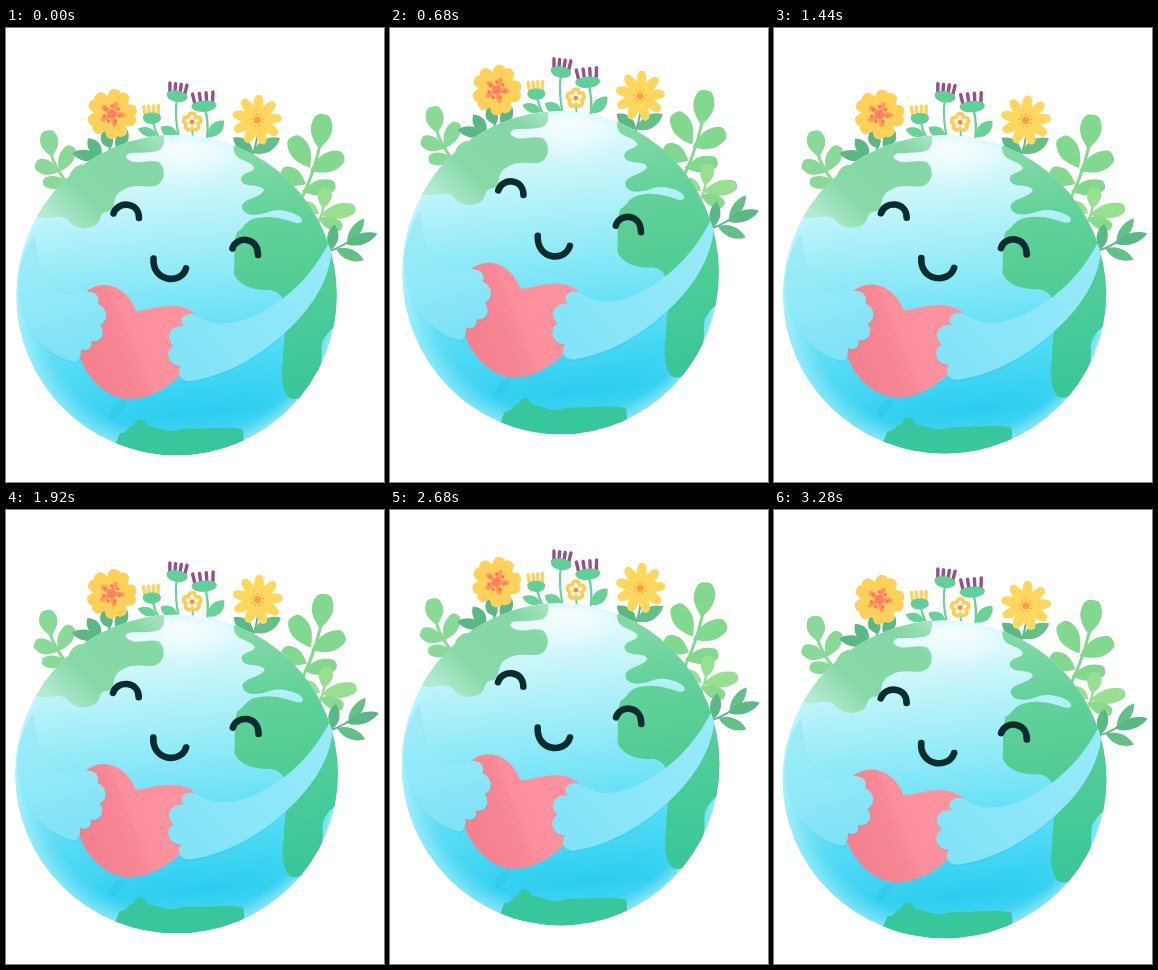
Recreate the animation shown at these times as an HTML page with a canvas. Size 378 by 454 pixels, loop 3320 ms.

```html
<!DOCTYPE html>
<html lang="en">
<head>
<meta charset="utf-8">
<title>Happy Earth</title>
<style>
html, body { margin: 0; width: 100%; height: 100%; overflow: hidden; background: #fff; }
canvas { display: block; width: 378px; height: 454px; }
</style>
</head>
<body>
<canvas id="stage" width="378" height="454"></canvas>
<script>
const ctx = document.getElementById('stage').getContext('2d');
const LOOP = 3320, STEP = 40;
const CX = 170.5, CY = 267, R = 160.3;
const TOP = 55, BASE = 427;

// time, highest flower, bottom of the globe
const bounce = [
  [0, 55, 427], [360, 44, 418], [560, 34.5, 410], [790, 29, 404],
  [1000, 33, 408], [1120, 38.5, 412.5], [1400, 54, 424], [1640, 60, 428.5],
  [1920, 53, 423], [2240, 40.5, 415], [2320, 38, 413], [2460, 36.5, 411.5],
  [2640, 39.5, 414], [2800, 46.5, 419.5], [2960, 54, 424], [3140, 59, 428],
  [3280, 59, 428], [3320, 58.5, 427.5]
];

function sample(t, col) {
  const n = bounce.length;
  let i = 0;
  while (i < n - 2 && t >= bounce[i + 1][0]) i++;
  const slope = j => {
    const a = bounce[Math.max(j - 1, 0)], b = bounce[Math.min(j + 1, n - 1)];
    return (b[col] - a[col]) / (b[0] - a[0]);
  };
  const a = bounce[i], b = bounce[i + 1], d = b[0] - a[0], u = (t - a[0]) / d;
  const u2 = u * u, u3 = u2 * u;
  return (2 * u3 - 3 * u2 + 1) * a[col] + (u3 - 2 * u2 + u) * d * slope(i) +
    (3 * u2 - 2 * u3) * b[col] + (u3 - u2) * d * slope(i + 1);
}

function linear(x0, y0, x1, y1, ...stops) {
  const g = ctx.createLinearGradient(x0, y0, x1, y1);
  stops.forEach(([p, c]) => g.addColorStop(p, c));
  return g;
}

function fill(path, style) {
  ctx.fillStyle = style;
  ctx.fill(typeof path === 'string' ? new Path2D(path) : path);
}

function line(d, color, width) {
  ctx.strokeStyle = color;
  ctx.lineWidth = width;
  ctx.lineCap = 'round';
  ctx.stroke(new Path2D(d));
}

function oval(x, y, rx, ry, color) {
  ctx.fillStyle = color;
  ctx.beginPath();
  ctx.ellipse(x, y, rx, ry, 0, 0, 7);
  ctx.fill();
}

// Leaf grows from its base; 0 degrees points up, positive leans right.
function leaf(x, y, len, w, deg, color, pointed) {
  ctx.save();
  ctx.translate(x, y);
  ctx.rotate(deg * Math.PI / 180);
  ctx.fillStyle = color;
  ctx.beginPath();
  ctx.moveTo(0, 0);
  if (pointed) {
    ctx.bezierCurveTo(-w * 0.7, -len * 0.3, -w * 0.64, -len * 0.72, 0, -len);
    ctx.bezierCurveTo(w * 0.64, -len * 0.72, w * 0.7, -len * 0.3, 0, 0);
  } else {
    ctx.bezierCurveTo(-w * 0.3, -len * 0.2, -w * 0.65, -len * 0.45, -w / 2, -len * 0.75);
    ctx.bezierCurveTo(-w * 0.4, -len * 0.95, -w * 0.3, -len, 0, -len);
    ctx.bezierCurveTo(w * 0.3, -len, w * 0.4, -len * 0.95, w / 2, -len * 0.75);
    ctx.bezierCurveTo(w * 0.65, -len * 0.45, w * 0.3, -len * 0.2, 0, 0);
  }
  ctx.fill();
  ctx.restore();
}

function petals(x, y, n, len, w, color, turn = 0) {
  for (let i = 0; i < n; i++) leaf(x, y, len, w, turn + i * 360 / n, color);
}

function dots(x, y, n, r, size, color) {
  for (let i = 0; i < n; i++) {
    const a = i * Math.PI * 2 / n;
    oval(x + r * Math.sin(a), y - r * Math.cos(a), size, size, color);
  }
}

function tuft(x, y, w, n, h, color, tilt) {
  ctx.save();
  ctx.translate(x, y);
  ctx.rotate(tilt);
  for (let i = 0; i < n; i++) {
    const px = (i / (n - 1) - 0.5) * w * 0.78;
    line(`M${px * 0.9} -2L${px * 1.05} ${-h}`, color, 3.4);
  }
  fill(`M${-w / 2} -1C${-w / 2} -7 ${w / 2} -7 ${w / 2} 0C${w / 2} 8 ${-w / 2} 8 ${-w / 2} -1Z`, '#61cf98');
  ctx.restore();
}

const LIGHT = '#8ad998', BRIGHT = '#82d88f', DARK = '#5ab786', STEM = '#69d19a';

function plants() {
  // left shrub
  line('M44 122Q49 143 66 160', LIGHT, 3);
  leaf(46, 129, 27, 17, -10, LIGHT);
  leaf(53, 144, 25, 14, -70, LIGHT);
  leaf(53, 144, 29, 14, 27, LIGHT);
  leaf(63, 155, 26, 12, -88, LIGHT);
  leaf(62, 153, 22, 10, 48, LIGHT);
  leaf(94, 130, 28, 11, -80, DARK, true);
  leaf(95, 128, 22, 12, -36, DARK, true);

  // right shrub
  line('M317 100Q312 137 295 172', BRIGHT, 3);
  leaf(313, 121, 35, 20, 7, BRIGHT);
  leaf(304, 140, 36, 19, -30, BRIGHT);
  leaf(304, 143, 37, 18, 65, BRIGHT);
  leaf(300, 156, 28, 17, -63, BRIGHT);
  leaf(296, 163, 34, 15, 80, BRIGHT);
  line('M319 166Q318 187 307 207', '#98df91', 2.5);
  leaf(317, 181, 22, 13, 8, '#98df91');
  leaf(314, 187, 36, 14, 79, '#98df91');
  leaf(312, 190, 26, 12, 112, '#8bd990');
  leaf(313, 186, 19, 10, -55, '#98df91');

  // sprig on the right
  line('M320 224Q340 219 354 203', DARK, 1.8);
  leaf(341, 215, 30, 10, 35, '#65bf89', true);
  leaf(340, 216, 33, 11, 72, DARK, true);
  leaf(330, 221, 30, 11, 112, '#65bf89', true);
  leaf(325, 222, 26, 11, 8, DARK, true);

  // orange flower with five notched petals
  line('M106 96Q107 112 103 123', DARK, 2);
  leaf(105, 120, 19, 12, -25, DARK, true);
  leaf(110, 120, 21, 12, 34, DARK, true);
  petals(106, 86, 5, 25, 13, '#ffd15a', 8);
  petals(106, 86, 5, 25, 13, '#ffd15a', 36);
  petals(106, 86, 5, 13, 5, '#ff9a5b', 22);
  oval(106, 86, 4.5, 4.5, '#fb7f62');
  dots(106, 86, 7, 8, 1.7, '#f9756a');

  // small blossoms on stems
  line('M147 92Q148 101 153 110', STEM, 2.2);
  leaf(151, 107, 20, 9, -72, STEM, true);
  tuft(146, 90, 18, 4, 12, '#ffd25d', -0.08);
  line('M171 70Q168 88 173 110', STEM, 2.2);
  leaf(172, 109, 20, 11, -60, STEM, true);
  tuft(171, 68, 21, 4, 12, '#984f8b', 0.12);
  line('M199 80Q203 95 201 111', STEM, 2.4);
  leaf(202, 109, 23, 12, 44, STEM, true);
  tuft(198, 78, 25, 4, 13, '#984f8b', -0.1);

  line('M186 99L187 111', STEM, 2);
  petals(186, 94, 5, 10.5, 9, '#fdcc55');
  petals(186, 94, 5, 7, 4, '#fff5d8');
  oval(186, 94, 2.4, 2.4, '#ef8c42');

  // yellow flower
  line('M251 96Q253 111 246 128', DARK, 2);
  leaf(247, 125, 25, 12, -52, DARK, true);
  leaf(247, 125, 31, 13, 61, '#65bf89', true);
  petals(251, 92, 9, 25, 9.5, '#ffd65e', 5);
  oval(251, 92, 3.6, 3.6, '#f7a34b');
  dots(251, 92, 9, 6, 0.8, '#f2a04b');
}

const disc = new Path2D();
disc.arc(CX, CY, R, 0, 7);

const heart = new Path2D('M130 283C122 261 102 252 86 260C65 270 65 297 72 323' +
  'C79 350 101 370 122 371C149 372 179 350 192 322C207 294 186 276 162 278C147 279 138 283 130 283Z');

const leftArm = new Path2D('M28 206C30 232 34 253 48 262C58 268 67 268 78 264' +
  'C88 262 95 268 92 276C103 281 102 293 94 297C101 306 94 315 85 313C87 321 80 324 75 321' +
  'C75 328 74 332 70 334C49 331 26 313 16 284C8 258 14 226 28 206Z');

const rightArm = new Path2D('M322 216C306 247 281 273 246 289C225 298 206 298 190 287' +
  'C180 283 171 291 178 298C164 297 158 309 168 318C159 321 160 337 175 338' +
  'C170 346 174 353 184 353C225 347 262 323 290 294C310 273 325 247 326 219Z');

const eyes = 'M107.5 185.5C111 173 133 173 133 190M226.5 220.5C230 208 252 208 252 227';
const smile = 'M147.5 230.5C146 254 175 257 180 240.5';

function globe() {
  ctx.save();
  ctx.clip(disc);
  fill(disc, linear(160, 107, 190, 427, [0, '#ffffff'], [0.08, '#e0fafc'], [0.28, '#b2f1f9'],
    [0.5, '#80e6f7'], [0.7, '#4fdaf5'], [0.87, '#2ccdf0'], [1, '#43d4f1']));

  const glow = ctx.createRadialGradient(182, 105, 5, 182, 105, 55);
  glow.addColorStop(0, 'rgba(255,255,255,.8)');
  glow.addColorStop(1, 'rgba(255,255,255,0)');
  fill(disc, glow);

  const rim = ctx.createRadialGradient(185, 255, 125, CX, CY, R);
  rim.addColorStop(0, 'rgba(190,246,252,0)');
  rim.addColorStop(0.6, 'rgba(170,242,252,.08)');
  rim.addColorStop(1, 'rgba(200,247,252,.55)');
  fill(disc, rim);

  // left continent
  fill('M20 190L33 189C43 193 51 185 61 191C69 202 82 202 91 196C97 188 92 185 104 183' +
    'C111 177 105 168 117 162C128 155 139 160 149 158C160 154 160 140 153 134' +
    'C141 130 130 139 120 130C120 122 130 126 144 124C158 124 160 117 157 100L60 90Z',
    linear(155, 108, 58, 204, [0, '#a3e4c0'], [0.2, '#86d7a6'], [0.7, '#87d9a8'], [1, '#b4ead3']));

  // right continent
  fill('M227 110L228 123C230 133 244 132 248 139C249 145 236 143 235 151C236 161 255 155 258 162' +
    'C255 170 238 170 236 178C236 189 252 188 262 184C272 180 285 183 293 188C298 192 296 196 290 195' +
    'C278 191 265 187 251 190C239 192 239 200 231 204C227 215 229 232 228 246' +
    'C233 258 247 262 260 262C274 261 279 271 280 285C280 303 277 317 277 332' +
    'C274 350 277 369 286 371C300 372 307 359 313 344C319 329 312 316 319 309' +
    'C325 300 329 299 345 285L345 120Z',
    linear(255, 125, 292, 370, [0, '#82d9a6'], [0.25, '#64d19a'], [0.5, '#55cd96'], [0.8, '#43c99a'], [1, '#39c698']));

  // southern land
  fill('M110 415L114 405C121 405 122 399 128 397C132 387 139 391 142 398C152 399 161 405 172 402' +
    'C184 399 191 402 202 400C214 400 224 399 236 401C239 406 236 411 239 415L225 435L125 435Z', '#38c69c');
  fill('M103 391C105 379 110 373 120 372C119 382 113 386 109 390Z', 'rgba(43,194,225,.4)');
  ctx.restore();
}

function arm(path, style, dx) {
  ctx.save();
  ctx.clip(disc);
  ctx.save();
  ctx.translate(dx, 2);
  fill(path, 'rgba(45,185,220,.18)');
  ctx.restore();
  fill(path, style);
  ctx.restore();
}

function pulse(t) {
  const k = (t - 2760) / 440;
  if (k <= 0 || k >= 1) return;
  const s = 1 + 0.99 * k;
  ctx.save();
  ctx.clip(disc);
  ctx.globalAlpha = 0.8 * (1 - k);
  ctx.translate(128, 311);
  ctx.scale(s, s);
  ctx.translate(-128, -311);
  fill(heart, '#fb8b99');
  ctx.restore();
}

function draw(t) {
  const top = sample(t, 1), base = sample(t, 2);
  const h = BASE - TOP, sy = (base - top) / h;
  const sx = 1 - (base - top - h) * 0.0036;
  ctx.setTransform(1, 0, 0, 1, 0, 0);
  ctx.fillStyle = '#fff';
  ctx.fillRect(0, 0, 378, 454);
  ctx.setTransform(sx, 0, 0, sy, CX * (1 - sx), base - BASE * sy);

  plants();
  globe();
  fill(heart, linear(85, 330, 175, 295, [0, '#f5818f'], [0.42, '#f88896'], [0.5, '#fd8f9c'], [1, '#fd929e']));
  arm(leftArm, linear(25, 210, 60, 330, [0, '#a0ecf8'], [0.5, '#92e9f8'], [1, '#7fe2f6']), 1);
  arm(rightArm, linear(315, 225, 190, 345, [0, '#97eaf8'], [0.5, '#8ce7f8'], [1, '#83e4f7']), 0);
  line(eyes, '#082d2e', 6.6);
  line(smile, '#082d2e', 6.6);
  pulse(t);
}

const start = performance.now();
function tick() {
  const t = (performance.now() - start) % LOOP;
  draw(Math.floor(t / STEP) * STEP);
  requestAnimationFrame(tick);
}
tick();
</script>
</body>
</html>
```
